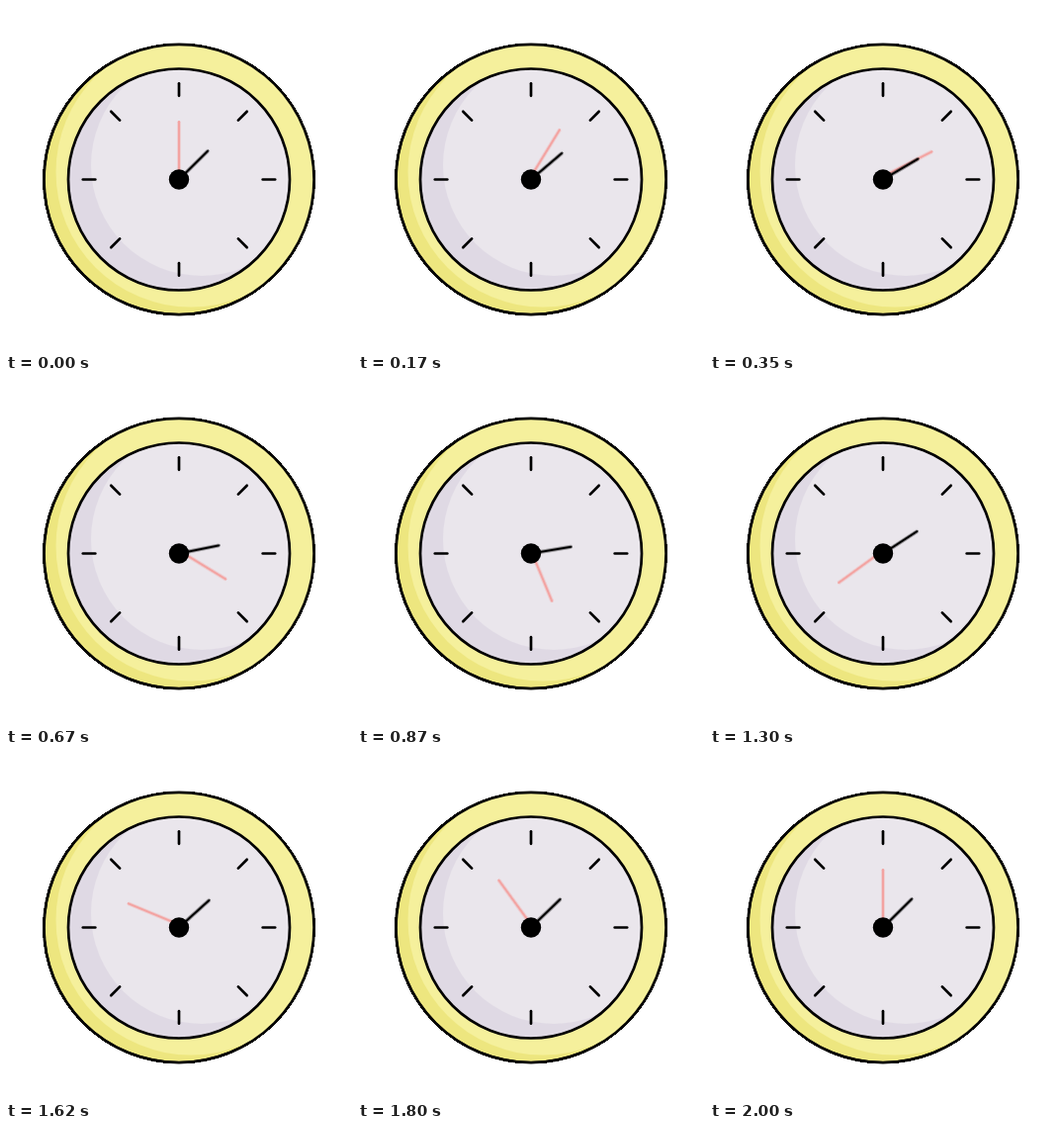
Animation, 350 px wide and 350 px high, one loop 2.02 s. Source, as an HTML page:

```html
<!DOCTYPE html>
<html>
<head>
<meta charset="utf-8">
<style>
  html, body { margin: 0; width: 100%; height: 100%; overflow: hidden; background: #fff; }
  svg { display: block; width: 100vw; height: 100vh; }
  line, .rim { stroke: #000; stroke-width: 2.7; stroke-linecap: round; }
  .rim { fill: none; }
  #minute { stroke: #f3a3a1; transform-origin: 175px 172.5px; }
  #hour { transform-origin: 175px 175.5px; }
</style>
</head>
<body>
<svg viewBox="0 0 350 350">
  <defs>
    <clipPath id="body"><circle cx="175" cy="175.5" r="136.5"/></clipPath>
    <clipPath id="face"><circle cx="175" cy="175.5" r="112"/></clipPath>
  </defs>
  <circle cx="175" cy="175.5" r="138" shape-rendering="crispEdges"/>
  <circle cx="175" cy="175.5" r="135.4" fill="#ede67f"/>
  <g clip-path="url(#body)"><circle cx="187" cy="168" r="136.5" fill="#f5f09c"/></g>
  <circle class="rim" cx="175" cy="175.5" r="136.6"/>
  <circle cx="175" cy="175.5" r="112" fill="#dfd9e4"/>
  <g clip-path="url(#face)"><circle cx="198" cy="161" r="112" fill="#eae6ec"/></g>
  <circle class="rim" cx="175" cy="175.5" r="112"/>
  <g id="ticks"></g>
  <line id="minute" x1="175" y1="172.5" x2="175" y2="117.3"/>
  <line id="hour" x1="175" y1="175.5" x2="175" y2="134.7"/>
  <circle cx="175" cy="175.5" r="10.2"/>
</svg>
<script>
  const $ = id => document.getElementById(id);

  for (let a = 0; a < 360; a += 45)
    $('ticks').innerHTML += `<line x1="175" y1="78.3" x2="175" y2="90.8" transform="rotate(${a} 175 175.5)"/>`;

  const turn = (deg, more) => ({ transform: `rotate(${deg}deg)`, ...more });
  const hands = [
    $('minute').animate([turn(0), turn(360)], { duration: 2000, fill: 'both' }),
    $('hour').animate([
      turn(45.3, { easing: 'cubic-bezier(.333, 0, .667, 1)' }),
      turn(81.6, { offset: .41, easing: 'cubic-bezier(.25, .1, .27, 1)' }),
      turn(45.3)
    ], { duration: 2000, fill: 'both' })
  ];
  hands.forEach(h => h.pause());

  const start = performance.now();
  function draw() {
    const t = Math.max(0, performance.now() - start) % 2020;
    // 25 ms steps, each starting on a whole 10 ms
    const step = Math.floor((Math.floor(t / 10) * 10 + 5) / 25);
    hands.forEach(h => h.currentTime = step * 25);
    requestAnimationFrame(draw);
  }
  draw();
</script>
</body>
</html>
```
